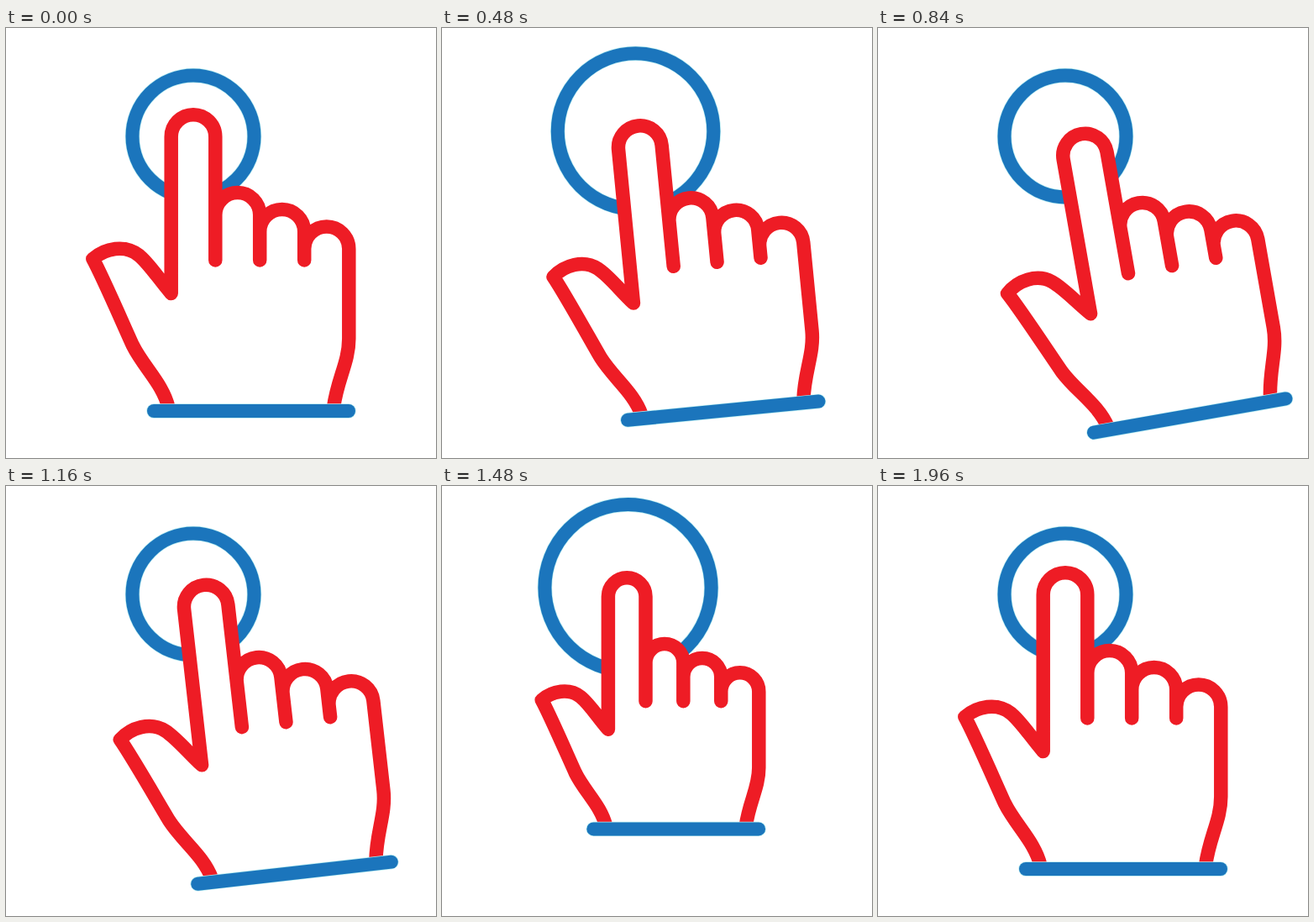
Animation of 512 by 512 pixels, one loop 2 s. Source, as an HTML page:

```html
<!DOCTYPE html>
<html lang="en">
<head>
<meta charset="utf-8">
<title>Tap gesture</title>
<style>
  html, body { margin: 0; width: 100%; height: 100%; overflow: hidden; background: #fff; }
  svg { display: block; width: 100%; height: 100%; }
  .red { fill: #fff; stroke: #ee1c25; stroke-linejoin: round; }
  .blue { fill: none; stroke: #1b75bc; stroke-linecap: round; }
  .halo { fill: none; stroke: #b4ecf0; stroke-linecap: round; }
</style>
</head>
<body>
<svg viewBox="0 0 512 512">
  <g id="ring">
    <circle class="halo" stroke-width="17.4"/>
    <circle class="blue" stroke-width="16"/>
  </g>
  <!-- Hand coordinates are relative to the fingertip centre. -->
  <g id="hand">
    <g transform="translate(-223 -129)">
      <path class="red" data-width="16.5" d="M193.500 452C187 424 164 404 151 378C140 354 115 296 103.500 275
        C118 262 142 257.500 158 270.500C170 280 182 299 196.700 316V129.500A26 26 0 0 1 249.300 129.500V276.500V222.500
        A26.300 26.300 0 0 1 302.200 222.500V276.500V242.500A26.300 26.300 0 0 1 355.200 242.500V276.500V263
        A26.500 26.500 0 0 1 408.300 263V370C408.300 398 394.500 418 390 452"/>
      <path class="halo" data-width="17.4" d="M176 456H408"/>
      <path class="blue" data-width="16" d="M176 456H408"/>
    </g>
  </g>
</svg>
<script>
const LOOP = 2000;
const TIP = { x: 223, y: 129 };
const RADIUS = 72.5;
const circles = document.querySelectorAll('#ring circle');
const hand = document.getElementById('hand');
const strokes = hand.querySelectorAll('[data-width]');

const ramp = (t, from, to) => Math.min(1, Math.max(0, (t - from) / (to - from)));
const pulse = (t, start, peak, end) => ramp(t, start, peak) - ramp(t, peak, end);

function drawRing(t) {
  const first = pulse(t, 242, 559, 838);
  const second = pulse(t, 1180, 1484, 1782);
  const grow = first + second;
  for (const circle of circles) {
    circle.setAttribute('cx', TIP.x + 10 * first - 1.5 * second);
    circle.setAttribute('cy', TIP.y - 8 * grow);
    circle.setAttribute('r', RADIUS + 26.9 * grow);
  }
}

function drawHand(t) {
  const swing = ramp(t, 248, 666) - ramp(t, 1013, 1431);
  // The tap on the way out mirrors the one on the way back.
  const press = pulse(t, 40, 249, 500) + pulse(t, 1180, 1431, 1640);
  const scale = 1 - 0.2 * press;
  const x = TIP.x + 23.5 * swing - 3.7 * press;
  const y = TIP.y + 22.5 * swing + 2.8 * press;
  hand.setAttribute('transform', `translate(${x} ${y}) rotate(${-10 * swing}) scale(${scale})`);
  // Line weight stays constant while the hand shrinks.
  for (const el of strokes) el.setAttribute('stroke-width', el.dataset.width / scale);
}

function draw(t) {
  drawRing(t);
  drawHand(t);
}

const start = performance.now();
function tick() {
  draw((performance.now() - start) % LOOP);
  requestAnimationFrame(tick);
}
draw(0);
requestAnimationFrame(tick);
</script>
</body>
</html>
```
